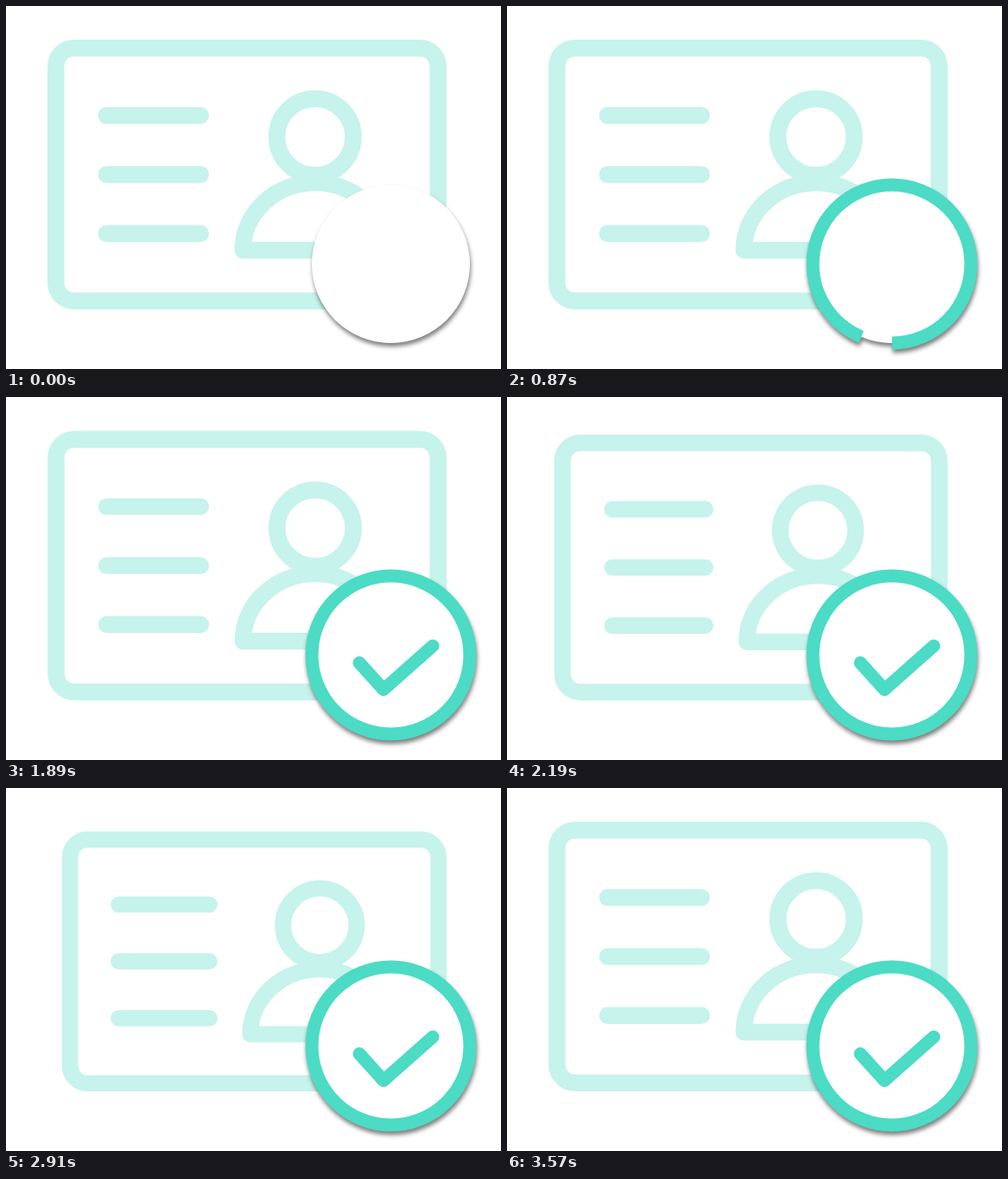
These frames come from a looping animation (573 by 420 pixels, 3.63 s). An HTML page:

```html
<!DOCTYPE html>
<html lang="en">
<head>
<meta charset="utf-8">
<title>Identity card verified</title>
<style>
  html, body { margin: 0; width: 100%; height: 100%; overflow: hidden; background: #fff; }
  svg { display: block; width: 100%; height: 100%; fill: none; }
  #card { stroke: #c6f3eb; stroke-width: 19.5; stroke-linecap: round; stroke-linejoin: round; }
  #badge { stroke: #4cdbc4; stroke-width: 15; filter: drop-shadow(1px 4px 2.5px rgba(0, 0, 0, .5)); }
  #check { stroke-linecap: round; stroke-linejoin: round; }
</style>
</head>
<body>
<svg viewBox="0 0 573 420">
  <g id="card">
    <rect x="57.75" y="48.75" width="442.5" height="292.5" rx="21"/>
    <path d="M116.25 126.75h109M116.25 195h109M116.25 263.25h109"/>
    <circle cx="357.75" cy="151.5" r="44.25"/>
    <path d="M274.25 282.5a83.5 78 0 0 1 167 0z"/>
  </g>
  <g id="badge">
    <circle cx="445.5" cy="298.5" r="91.5" fill="#fff" stroke="none"/>
    <path id="ring" pathLength="1" d="M445.5 390a91.5 91.5 0 0 0 0-183a91.5 91.5 0 0 0 0 183"/>
    <path id="check" pathLength="1" d="M409 307.5L437 338.5L494 288"/>
  </g>
</svg>
<script>
const LOOP = 3630;
const [card, ring, check] = ['card', 'ring', 'check'].map(id => document.getElementById(id));

// Cubic Bezier timing curve with control heights 0 and 1
const curve = (x1, x2) => x => {
  const at = (s, a, b) => 3 * (1 - s) ** 2 * s * a + 3 * (1 - s) * s * s * b + s ** 3;
  let low = 0, high = 1;
  for (let i = 0; i < 30; i++) {
    const mid = (low + high) / 2;
    if (at(mid, x1, x2) < x) low = mid; else high = mid;
  }
  return at(low, 0, 1);
};
const easeOut = curve(0, 0.58);
const easeInOut = curve(0.42, 0.58);
const clamp = x => Math.min(1, Math.max(0, x));

function reveal(path, amount) {
  path.style.visibility = amount > 0.0001 ? 'visible' : 'hidden';
  path.style.strokeDasharray = amount > 0.9999 ? 'none' : `${amount} 2`;
}

function draw(t) {
  reveal(ring, easeOut(clamp(t / 1090)));
  reveal(check, easeInOut(clamp((t - 1025) / 705)));
  // The card shrinks towards its bottom right corner and grows back
  const scale = 1 - 0.04 * easeInOut(clamp(1 - Math.abs(t - 2715) / 900));
  card.setAttribute('transform', `translate(510 351) scale(${scale}) translate(-510 -351)`);
}

let start;
function tick(now) {
  start ??= now;
  draw((now - start) % LOOP);
  requestAnimationFrame(tick);
}
draw(0);
requestAnimationFrame(tick);
</script>
</body>
</html>
```
